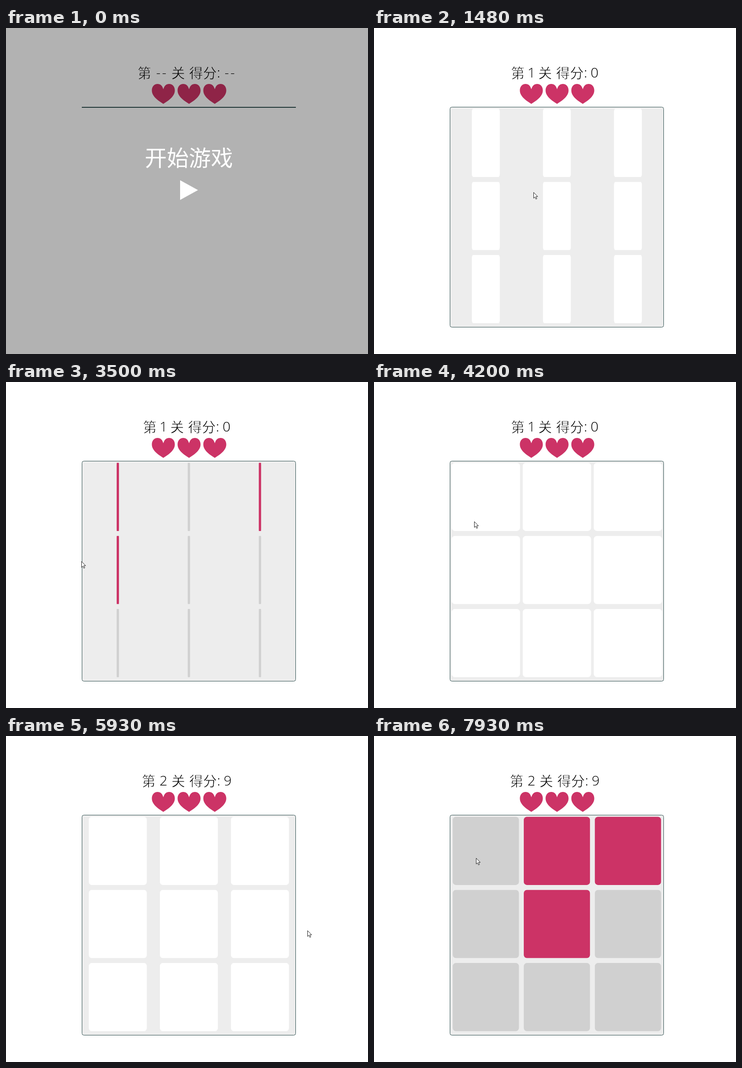
An HTML page that plays this animation: 788 px wide and 711 px high, repeating every 8 s.

```html
<!DOCTYPE html>
<html lang="zh-CN">
<head>
<meta charset="utf-8">
<title>记忆翻牌</title>
<style>
html, body { margin: 0; width: 100%; height: 100%; overflow: hidden; background: #fff; }
svg { display: block; width: 100%; height: 100%; }
text { font-family: "Noto Sans CJK SC", "Noto Sans CJK", "Noto Sans CJK JP", sans-serif; }
/* the white outline thins the strokes to a light weight */
#head text { font-size: 30px; stroke: #fff; stroke-width: .8px; }
#head .latin {
  font-family: "Open Sans", "Noto Sans", sans-serif;
  font-weight: 300; text-anchor: middle; letter-spacing: 3px; stroke: none;
}
</style>
</head>
<body>
<svg viewBox="0 0 788 711">
  <defs>
    <path id="heart" fill="#c36" d="M25 11.5C22.5 3.5 18.500 12.5 0C5 0 0 6 0 14C0 27 13 36 25 43.500C37 36 50 27 50 14C50 6 45 0 37.500C31.500 27.5 3.5 25 11.5Z"/>
  </defs>
  <rect width="788" height="711" fill="#fff"/>
  <g id="head">
    <text id="nth" y="109">第</text>
    <text id="level" class="latin" y="108"></text>
    <text id="stage" y="109">关</text>
    <text id="label" y="109">得分</text>
    <text id="colon" class="latin" y="108">:</text>
    <text id="score" class="latin" y="108"></text>
  </g>
  <g id="hearts"></g>
  <g id="board">
    <rect x="165.5" y="172.5" width="465" height="480" rx="4" fill="#ededed" stroke="#2f4f4f"/>
  </g>
  <g id="cover">
    <rect x="165" y="172" width="466" height="2" fill="#2f4f4f"/>
    <rect width="788" height="711" opacity=".3"/>
    <text x="302" y="301" font-size="48" fill="#fff">开始游戏</text>
    <path d="M379 332L418 353.5L379 375Z" fill="#fff"/>
  </g>
  <path id="cursor" d="M.5 .5V13.2L3.4 10.5L5.4 15.2L7.5 14.3L5.5 9.7H9.4Z" fill="#fff" stroke="#222"/>
</svg>
<script>
const LOOP = 8000, FLIP = 1000;
const START = 1250, HIDE = 3213, CLICKS = [4470, 4943, 5400], NEXT = 5785, HIDE_NEXT = 7841;
const WHITE = '#fff', GREY = '#d0d0d0', PINK = '#c36';
const $ = id => document.getElementById(id);

const levels = [[0, 2, 3], [1, 2, 4]];
const picks = [0, 3, 2];

// each move of the pointer: leaves at, arrives at, new tip position
const home = [517, 552];
const moves = [
  [390, 1160, 397, 349], [START, 2020, 164, 391], [4020, 4200, 218, 304],
  [4340, 4500, 240, 262], [4640, 4900, 250, 385], [4980, 5220, 533, 258],
  [5430, 6240, 716, 504], [6430, 7060, 206, 290], [7140, 7220, 222, 266]
];

function add(parent, tag, attrs) {
  const el = document.createElementNS('http://www.w3.org/2000/svg', tag);
  for (const k in attrs) el.setAttribute(k, attrs[k]);
  return $(parent).appendChild(el);
}

const heartPath = 'M25 11.5C22.5 3.5 18.5 0 12.5 0C5 0 0 6 0 14C0 27 13 36 25 43.5' +
  'C37 36 50 27 50 14C50 6 45 0 37.5 0C31.5 0 27.5 3.5 25 11.5Z';
$('heart').setAttribute('d', heartPath);
for (let i = 0; i < 3; i++) add('hearts', 'use', { href: '#heart', x: 317.5 + i * 56, y: 122 });

const cards = Array.from({ length: 9 }, (_, i) => ({
  el: add('board', 'rect', { x: -74.4, width: 148.8, height: 148.6, rx: 7 }),
  x: 243.4 + i % 3 * 154.7,
  y: 176.3 + Math.floor(i / 3) * 159.4
}));

// cubic-bezier(.25, .1, .25, 1)
function ease(x) {
  if (x <= 0) return 0;
  if (x >= 1) return 1;
  const curve = (a, b, s) => 3 * a * s * (1 - s) ** 2 + 3 * b * s * s * (1 - s) + s ** 3;
  let lo = 0, hi = 1;
  for (let n = 0; n < 24; n++) {
    const mid = (lo + hi) / 2;
    if (curve(.25, .25, mid) < x) lo = mid; else hi = mid;
  }
  return curve(.1, 1, lo);
}

// latest flip of a card: when it began and whether it shows the colour
function lastFlip(i, t) {
  if (t >= HIDE_NEXT) return [HIDE_NEXT, false];
  if (t >= NEXT) return [NEXT, true];
  const click = CLICKS[picks.indexOf(i)];
  if (t >= click) return [click, true];
  return t >= HIDE ? [HIDE, false] : [START, true];
}

function drawCard(card, i, t) {
  const [start, open] = lastFlip(i, t);
  const p = ease((t - start) / FLIP);
  const face = levels[t < NEXT ? 0 : 1].includes(i) ? PINK : GREY;
  const sx = Math.abs(Math.cos(Math.PI * p)).toFixed(4);
  card.el.setAttribute('fill', (p > .5) === open ? face : WHITE);
  card.el.setAttribute('transform', `translate(${card.x} ${card.y}) scale(${sx} 1)`);
}

// a centred line whose two number slots vary in width
function setHead(level, score, levelW, scoreW) {
  const left = 393.25 - (144 + levelW + scoreW) / 2, stage = left + 30 + levelW;
  const xs = {
    nth: left, level: left + 31.5 + levelW / 2, stage,
    label: stage + 39, colon: stage + 104.5, score: stage + 115.5 + scoreW / 2
  };
  for (const id in xs) $(id).setAttribute('x', xs[id]);
  $('level').textContent = level;
  $('score').textContent = score;
}

function drawHead(t) {
  const score = 3 * CLICKS.filter(c => t >= c).length;
  if (t < START) setHead('--', '--', 43.5, 26.5);
  else if (t < NEXT) setHead(1, score, 29.5, 17);
  else setHead(2, score, 34.5, 17);
}

function drawCursor(t) {
  let [x, y] = home;
  for (const [from, to, nx, ny] of moves) {
    const k = Math.min(1, Math.max(0, (t - from) / (to - from)));
    const s = k * k * (3 - 2 * k);
    x += (nx - x) * s;
    y += (ny - y) * s;
  }
  $('cursor').style.display = t < moves[0][0] ? 'none' : '';
  $('cursor').setAttribute('transform', `translate(${Math.round(x)} ${Math.round(y)})`);
}

function draw(t) {
  const playing = t >= START;
  $('cover').style.display = playing ? 'none' : '';
  $('board').style.display = playing ? '' : 'none';
  drawHead(t);
  cards.forEach((card, i) => drawCard(card, i, t));
  drawCursor(t);
}

const begin = performance.now();
function tick() {
  draw((performance.now() - begin) % LOOP);
  requestAnimationFrame(tick);
}
tick();
</script>
</body>
</html>
```
